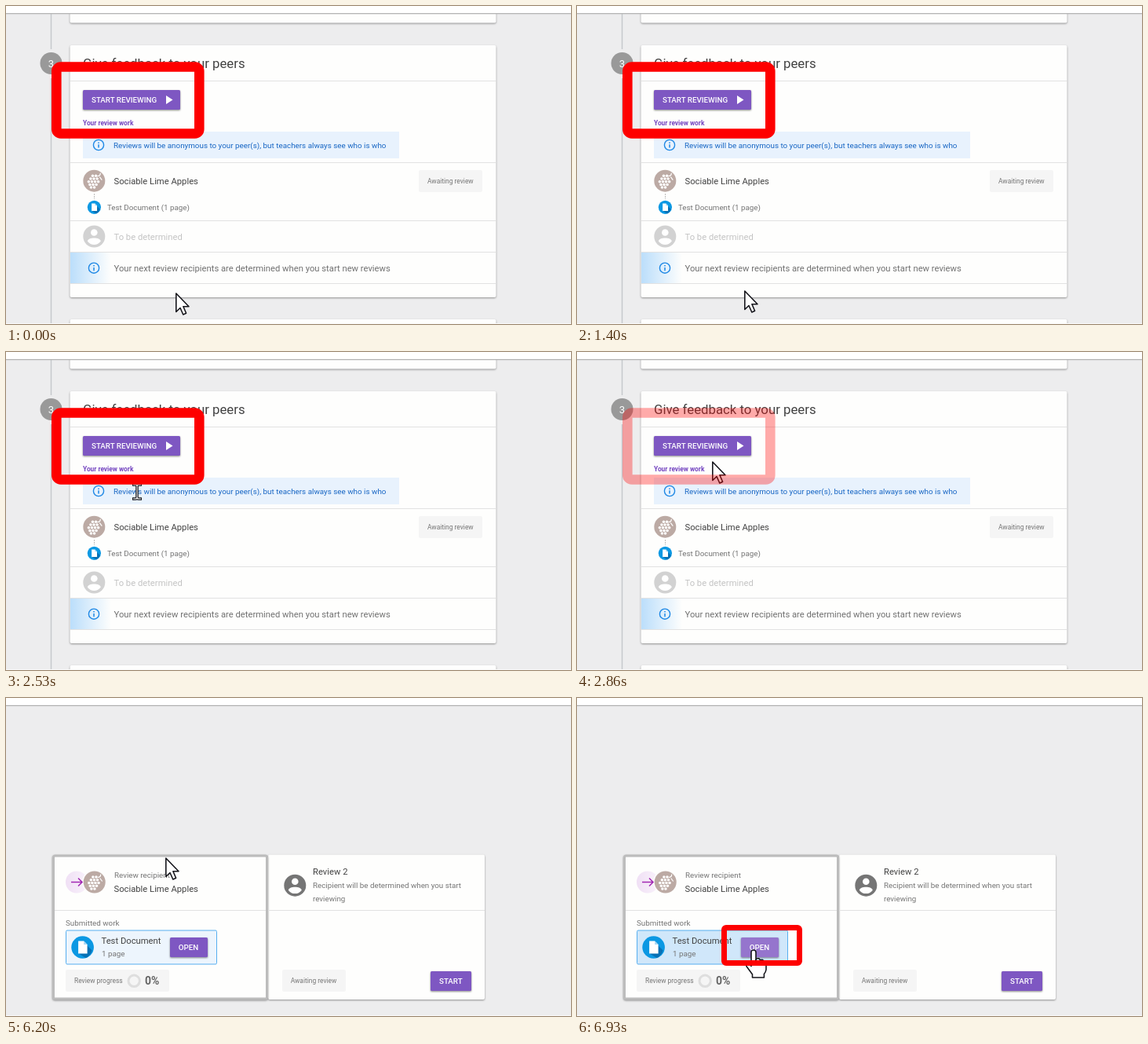
An HTML page for the animation above (8 s loop, 720 by 405 pixels).

```html
<!DOCTYPE html>
<html lang="en">
<head>
<meta charset="utf-8">
<title>Peer review</title>
<style>
  html, body { margin: 0; width: 100%; height: 100%; overflow: hidden; background: #ededee; }
  svg { display: block; width: 100vw; height: 100vh; }
  text { font-family: Roboto, sans-serif; font-size: 11.24px; fill: #424242; }
  .title { font-size: 16.8px; }
  .small { font-size: 9.8px; fill: #757575; }
  .tiny { font-size: 8.43px; fill: #757575; }
  .label { font-size: 9.8px; font-weight: 500; fill: #fff; }
  .card { fill: #fefefd; filter: drop-shadow(0 1px 1.2px #0006); }
  .btn { fill: #7e57c2; filter: drop-shadow(0 1px 1px #0007); }
  .btn.hover { fill: #9575cd; }
  .chip { fill: #f5f5f5; }
  .rule { stroke: #e2e2e2; fill: none; }
  .mark { fill: none; stroke: #fe0000; stroke-linejoin: round; }
  .tile { fill: #edf5fd; stroke: #56aef0; }
  .tile.hover { fill: #d0e7fa; }
  .pointer { fill: #fff; stroke: #16161c; stroke-width: 1.6; stroke-linejoin: round; }
</style>
</head>
<body>
<svg viewBox="0 0 720 405" xmlns="http://www.w3.org/2000/svg">
  <defs>
    <linearGradient id="fade">
      <stop offset="0" stop-color="#bbdefb"/>
      <stop offset="1" stop-color="#fefefd"/>
    </linearGradient>
    <linearGradient id="lilac">
      <stop offset="0" stop-color="#f0e0f5"/>
      <stop offset="1" stop-color="#f9f2fb"/>
    </linearGradient>
    <g id="info">
      <circle r="6.6" fill="none" stroke="#1e88e5" stroke-width="1.4"/>
      <path d="M0-.8V3.6M0-3.6V-2.1" stroke="#1e88e5" stroke-width="1.5"/>
    </g>
    <g id="person">
      <circle r="14"/>
      <circle cy="-5" r="4.3" fill="#fff"/>
      <path d="M-8.4 6.2C-8.4 .6 8.4 .6 8.4 6.2Q5 10.4 0 10.4T-8.4 6.2Z" fill="#fff"/>
    </g>
    <g id="doc">
      <circle r="14.3" fill="#0b98e3"/>
      <path d="M5-3L12 4Q10 11 4 13.6L-5 8Z" fill="#0871b5"/>
      <path d="M-5.5-8H1.5L6-3.5V8H-5.5Z" fill="#fff"/>
      <path d="M1.5-8V-3.5H6Z" fill="#a9d8f5"/>
    </g>
    <g id="avatar">
      <circle r="14" fill="#bcaaa4"/>
      <g id="berries" fill="#fff"></g>
      <path d="M4-6Q8-6 8-10M7-5L10-1" fill="none" stroke="#fff" stroke-width="1.2"/>
    </g>
  </defs>

  <rect width="720" height="405" fill="#ededee"/>

  <g id="list">
    <path d="M57.5 10V55M57.5 92V405" stroke="#c7c9cd" stroke-width="1.5"/>
    <rect class="card" x="81.5" y="-10" width="543" height="31.5" rx="2"/>
    <rect class="card" x="81.5" y="50" width="543" height="321" rx="2"/>
    <rect class="card" x="81.5" y="399" width="543" height="30" rx="2"/>
    <circle cx="57.5" cy="73" r="14" fill="#999"/>
    <text x="57.5" y="77.5" text-anchor="middle" style="font-size:13px;fill:#fff">3</text>
    <text class="title" x="98" y="78.5">Give feedback to your peers</text>
    <rect x="82" y="314" width="52" height="39" fill="url(#fade)"/>
    <path class="rule" d="M82 95.5H624M82 199.5H624M82 273.5H624M82 313.5H624M82 353.5H624"/>

    <rect class="btn" id="review" x="98" y="107" width="124" height="25" rx="1.5"/>
    <text class="label" x="109" y="123">START REVIEWING</text>
    <path d="M204 114L212.5 119.5L204 125Z" fill="#fff"/>
    <text x="98" y="151.5" style="font-size:8.35px;font-weight:700;fill:#7445c0">Your review work</text>

    <rect x="98" y="160" width="403" height="34" fill="#e8f2fd"/>
    <use href="#info" x="118" y="177"/>
    <text x="137" y="180.6" style="font-size:9.86px;fill:#1766c4">Reviews will be anonymous to your peer(s), but teachers always see who is who</text>

    <use href="#avatar" x="112.3" y="222.7"/>
    <text x="137.5" y="227">Sociable Lime Apples</text>
    <rect class="chip" x="526" y="209" width="81" height="28" rx="2"/>
    <text class="tiny" x="537" y="226">Awaiting review</text>
    <path d="M112.5 239V246" stroke="#bbb" stroke-dasharray="2 1"/>
    <use href="#doc" transform="translate(112.4 256.3) scale(.6)"/>
    <text class="small" x="129" y="260">Test Document (1 page)</text>

    <use href="#person" x="112.3" y="293.5" fill="#d2d2d2"/>
    <text x="137.5" y="298" style="fill:#c4c4c4">To be determined</text>
    <use href="#info" x="112" y="333.7"/>
    <text x="137.5" y="338" style="fill:#707070">Your next review recipients are determined when you start new reviews</text>
  </g>

  <g id="work">
    <rect class="card" x="334" y="199.5" width="276" height="184.5" rx="2"/>
    <rect class="card" x="60.5" y="201" width="272" height="182" rx="2" style="stroke:#bcbcbc;stroke-width:3"/>
    <path class="rule" d="M62 270.5H331M334 270.5H610"/>

    <circle cx="90" cy="234.5" r="14" fill="url(#lilac)"/>
    <circle cx="112.7" cy="234.5" r="15.5" fill="#fefefd"/>
    <use href="#avatar" x="112.7" y="234.5"/>
    <path d="M83 234.5H97M92 229.5L97 234.5L92 239.5" fill="none" stroke="#a228b3" stroke-width="1.5"/>
    <text class="small" x="138" y="229">Review recipient</text>
    <text x="137.5" y="247">Sociable Lime Apples</text>

    <text class="small" x="76" y="290">Submitted work</text>
    <rect class="tile" id="tile" x="76.5" y="296" width="192" height="43" rx="1.5"/>
    <use href="#doc" x="97.6" y="317.5"/>
    <text x="121.5" y="313">Test Document</text>
    <text class="small" x="122" y="329">1 page</text>
    <rect class="btn" id="open" x="209" y="305" width="48" height="25" rx="1.5"/>
    <text class="label" x="219.8" y="320.5">OPEN</text>

    <rect class="chip" x="76" y="346" width="132" height="28" rx="2"/>
    <text class="tiny" x="87" y="363">Review progress</text>
    <circle cx="163.2" cy="360.3" r="7.2" fill="none" stroke="#dedede" stroke-width="3"/>
    <text x="177" y="365.2" style="font-size:14px;font-weight:700;fill:#666">0%</text>

    <use href="#person" x="368.3" y="238.7" fill="#757575"/>
    <text x="391" y="225">Review 2</text>
    <text class="small" x="391" y="241.5">Recipient will be determined when you start</text>
    <text class="small" x="391" y="258.5">reviewing</text>
    <rect class="chip" x="352" y="346" width="81" height="28" rx="2"/>
    <text class="tiny" x="362.7" y="363">Awaiting review</text>
    <rect class="btn" x="541" y="348" width="52" height="25" rx="1.5"/>
    <text class="label" x="552" y="363.5">START</text>
  </g>

  <rect width="720" height="9" fill="#fff"/>
  <rect y="9" width="720" height="1.3" fill="#b4b4b4"/>
  <rect y="404" width="720" height="1" fill="#fafafa"/>

  <g id="cursor">
    <path id="arrow" class="pointer" d="M.8 1V24.5L6 19.5L9.8 28L13.6 26.3L9.9 17.8H17Z"/>
    <g id="beam" fill="none">
      <path d="M-6-9H-2Q0-9 0-7Q0-9 2-9H6M0-7V7M-6 9H-2Q0 9 0 7Q0 9 2 9H6" stroke="#16161c" stroke-width="3.6"/>
      <path d="M-5-9H-2Q0-9 0-7Q0-9 2-9H5M0-7V7M-5 9H-2Q0 9 0 7Q0 9 2 9H5" stroke="#fff" stroke-width="1.1"/>
    </g>
    <g id="hand" class="pointer">
      <path d="M-3 3Q-3 0 0 0T3 3V13Q3 10.5 6 10.8Q8.5 11 8.5 14Q9 12 11.3 12.4Q13.3 13 13.3 15.5Q13.8 14 15.3 14.8Q16.3 15.6 16 19V25Q15.6 28 13.4 30.5V35H-1.5V31L-8.8 21Q-11 17 -8.5 16.3Q-6 16 -3 20.5Z"/>
      <path d="M3 12V17.5M8.5 13V18M13.3 15V18.5" fill="none"/>
    </g>
  </g>

  <rect class="mark" id="mark1" x="64.3" y="77.5" width="182" height="85" rx="5.5" stroke-width="12.6"/>
  <rect class="mark" id="mark2" x="187.5" y="292.5" width="96" height="45" rx="2.5" stroke-width="7"/>
</svg>
<script>
  const $ = id => document.getElementById(id);
  const LOOP = 8000, FPS = 15, CUT = 93;

  // pointer stops: [tick, x, y]; "hold" ones wait until the next stop
  const hold = [[0, 216, 365], [2, 213, 365], [6, 215, 365], [14, 213, 364], [15, 212, 362], [21, 213, 362]];
  const reach = [[28, 212, 360], [30, 208, 352], [31, 205, 346], [33, 194, 312], [36, 175, 220],
    [38, 167, 178], [40, 170, 149], [43, 173, 134], [45, 175, 127], [50, 179, 117]];
  const open = [[CUT, 203, 203], [94, 203, 209], [96, 207, 235], [99, 217, 288], [101, 222, 310], [104, 225, 321]];

  const lines = [[137, 170, 485, 184], [137, 216, 243, 230], [137, 328, 490, 341]];
  const within = (x, y, [l, t, r, b]) => x >= l && x <= r && y >= t && y <= b;
  const clamp = v => Math.max(0, Math.min(1, v));
  const show = (id, on) => { $(id).style.display = on ? '' : 'none'; };

  function along(path, n) {
    const i = path.findIndex(p => p[0] > n);
    if (i < 0) return path[path.length - 1].slice(1);
    const [a, b] = [path[i - 1], path[i]], k = (n - a[0]) / (b[0] - a[0]);
    return [a[1] + (b[1] - a[1]) * k, a[2] + (b[2] - a[2]) * k];
  }

  function place(n) {
    if (n >= CUT) return along(open, n);
    if (n >= reach[0][0]) return along(reach, n);
    return hold.filter(p => p[0] <= n).pop().slice(1);
  }

  function draw(ms) {
    const n = Math.floor((ms + 5) * FPS / 1000) % (LOOP * FPS / 1000);
    const first = n < CUT, [x, y] = place(n);
    const onReview = first && within(x, y, [98, 107, 222, 132]);
    const onTile = !first && within(x, y, [76, 296, 269, 339]);
    const onOpen = !first && within(x, y, [209, 305, 257, 330]);
    const onText = first && lines.some(r => within(x, y, r));
    const hand = onReview || onTile;

    show('list', first);
    show('work', !first);
    $('review').classList.toggle('hover', onReview);
    $('tile').classList.toggle('hover', onTile);
    $('open').classList.toggle('hover', onOpen);
    $('cursor').setAttribute('transform', `translate(${x} ${y})`);
    show('hand', hand);
    show('beam', onText);
    show('arrow', !hand && !onText);
    $('mark1').style.opacity = first ? clamp((43 - n) / 3) : 0;
    $('mark2').style.opacity = first ? 0 : clamp((n - 101) / 3);
  }

  // cluster of berries, narrowing towards the lower left
  const ns = 'http://www.w3.org/2000/svg';
  [2, 3, 4, 3, 2].forEach((count, row) => {
    for (let i = 0; i < count; i++) {
      const c = document.createElementNS(ns, 'circle');
      c.setAttribute('cx', (i - (count - 1) / 2) * 4.1 - row * .5 + .2);
      c.setAttribute('cy', row * 3.7 - 6.4);
      c.setAttribute('r', 1.75);
      $('berries').append(c);
    }
  });

  const start = performance.now();
  function tick() {
    draw((performance.now() - start) % LOOP);
    requestAnimationFrame(tick);
  }
  tick();
</script>
</body>
</html>
```
